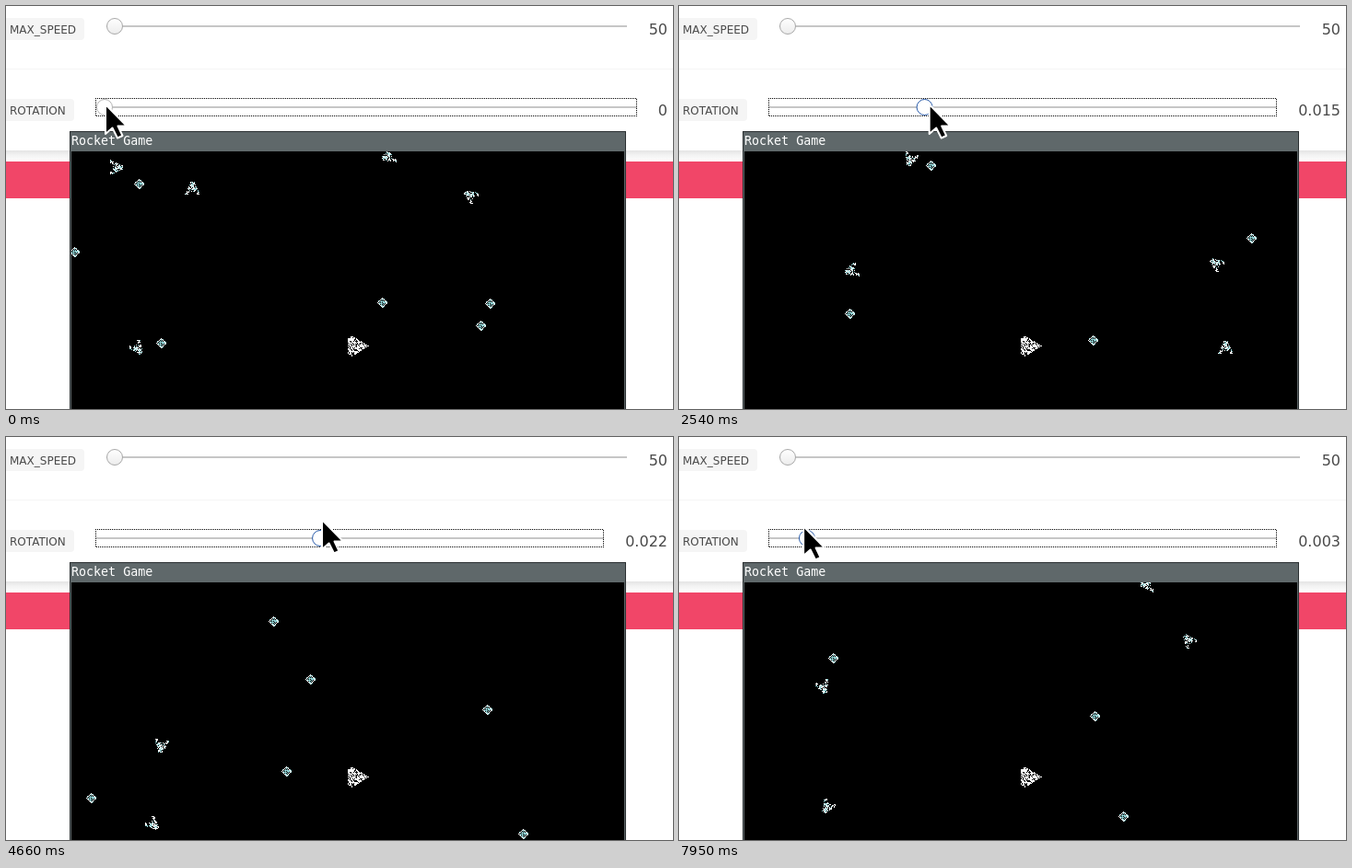
Write an HTML page that moves like this. It is 724 px wide and 438 px high and loops after 7990 ms.

```html
<!DOCTYPE html>
<html lang="en">
<head>
<meta charset="utf-8">
<title>Rocket Game</title>
<style>
html, body { margin: 0; width: 100%; height: 100%; overflow: hidden; background: #fff; }
svg { display: block; width: 724px; height: 438px; }
text { font-family: "DejaVu Sans", sans-serif; fill: #4a4a4a; }
.label { font-size: 12px; }
.value { font-size: 16px; text-anchor: end; }
.title { font: 13.333px "DejaVu Sans Mono", monospace; fill: #fff; }
.pixels { shape-rendering: crispEdges; }
</style>
</head>
<body>
<svg viewBox="0 0 724 438">
  <defs>
    <linearGradient id="shade" x2="0" y2="1">
      <stop offset="0" stop-color="#e4e4e4"/>
      <stop offset=".4" stop-color="#f2f2f2"/>
      <stop offset="1" stop-color="#fff"/>
    </linearGradient>
    <linearGradient id="knob" x2="0" y2="1">
      <stop offset="0" stop-color="#fff"/>
      <stop offset="1" stop-color="#ececec"/>
    </linearGradient>
    <clipPath id="view"><rect x="71" y="158" width="600" height="280"/></clipPath>
  </defs>
  <rect width="724" height="438" fill="#fff"/>
  <rect y="68" width="724" height="1" fill="#f5f5f5"/>
  <rect y="157" width="724" height="12" fill="url(#shade)"/>
  <rect y="169" width="724" height="40" fill="#f14668"/>

  <rect x="-6" y="13" width="91" height="24" rx="4" fill="#f5f5f5"/>
  <text class="label" x="4" y="30">MAX_SPEED</text>
  <rect x="109" y="21" width="565" height="2" fill="#c6c6c6"/>
  <circle cx="118" cy="22" r="8.500" fill="url(#knob)" stroke="#a8a8a8"/>
  <text class="value" x="718" y="31">50</text>

  <rect x="-6" y="101" width="80" height="24" rx="4" fill="#f5f5f5"/>
  <text class="label" x="4" y="118">ROTATION</text>
  <rect id="track" x="98" y="109" height="2" fill="#c6c6c6"/>
  <circle id="thumb" cy="110" r="8.500" fill="#fff"/>
  <path id="focus" fill="none" stroke="#000" stroke-dasharray="1 1" class="pixels"/>
  <text id="value" class="value" x="718" y="119"></text>

  <rect x="69" y="136" width="604" height="302" fill="#2c3133"/>
  <rect x="70" y="137" width="602" height="301" fill="#5f686a"/>
  <text class="title" x="71" y="151">Rocket Game</text>
  <rect x="71" y="158" width="600" height="280" fill="#000"/>
  <g clip-path="url(#view)" class="pixels">
    <path id="white" fill="#fff"/>
    <path id="cyan" fill="#8fd0d2"/>
  </g>
  <path id="cursor" d="M0 0V32L7.500 25.500L13 36.500L18.500 34L13.500 23.500H23Z" fill="#000" stroke="#fff" stroke-width="2" stroke-linejoin="round"/>
</svg>
<script>
const LOOP = 7990, CX = 382, CY = 369, DEG = Math.PI / 180;
const $ = id => document.getElementById(id);

// Turning points of the drag: time, slider value, pointer height
const DRAG = [
  [100, 0, 107], [1120, .0041, 107], [2870, .018, 107], [3410, .0345, 100],
  [4660, .0221, 90], [5200, .0167, 98], [5830, .0131, 107], [7000, .009, 101],
  [7950, .00255, 97]
];

const lerp = (a, b, k) => a + (b - a) * k;
const clamp = k => Math.max(0, Math.min(1, k));
const noise = (u, v) => {
  const n = Math.sin(u * 12.99 + v * 78.23 + 4) * 43758.5;
  return n - Math.floor(n);
};

// Slider value, pointer height and the angle turned so far
function drag(t) {
  let [, v, y] = DRAG[0], angle = 0;
  for (let i = 1; i < DRAG.length; i++) {
    const [t0, v0, y0] = DRAG[i - 1], [t1, v1, y1] = DRAG[i];
    const k = clamp((t - t0) / (t1 - t0));
    if (k === 0) break;
    v = lerp(v0, v1, k);
    y = lerp(y0, y1, k);
    angle += .06 * (v0 + v) / 2 * k * (t1 - t0);
  }
  return { v, y, angle };
}

function turn(x, y, a) {
  const c = Math.cos(a), s = Math.sin(a);
  return [x * c - y * s, x * s + y * c];
}

// Place relative to the rocket and steady drift per second
const SHIPS = [
  [-180, -171, 7, -12], [122, -163, .4, -3.2], [33, -206, 4, -3.7],
  [-168, 122, -4.6, -4], [-240, 2, -.5, -4.5], [-263, -194, -3.5, -7]
];
const ROCKS = [
  [-238, -176, -3, -3.5], [-308, -102, -7, 1], [26, -47, 2.8, -4.4],
  [143, -46, 10.5, 8], [133, -22, -3.2, 4.6], [-214, -3, -3.5, -8],
  [-34, -251, 30, -4.4], [-152, 150, 4, -3.5], [16, 189, -2.4, -6.7],
  [192, 167, 0, 0]
];

// Dot rules: 0 empty, 1 white, 2 cyan
function shipDot(u, v) {
  const w = Math.abs(v);
  if (u < -6 || u > 7) return 0;
  const wing = Math.abs(w - (7 - u) * .5) < 1.7;
  const hull = w < 3 && u > -4;
  const n = noise(u, v);
  return !(wing || hull) || n < .32 ? 0 : n < .8 ? 1 : 2;
}
function rockDot(u, v) {
  const m = Math.abs(u) + Math.abs(v);
  if (m > 6 || Math.abs(u) > 5 || Math.abs(v) > 5) return 0;
  if (m % 2) return m === 5 ? 1 : 2;
  return noise(u, v) > .7 ? 2 : 0;
}
function rocketDot(u, v) {
  const half = u < -3 ? 11 - Math.abs(u + 7) * .6 : (11 - u) * .65;
  return Math.abs(v) <= half && noise(u, v) > .33 ? 1 : 0;
}

function stamp(out, dot, x, y, size, angle) {
  x = Math.round(x);
  y = Math.round(y);
  for (let j = -size; j <= size; j++)
    for (let i = -size; i <= size; i++) {
      const [u, v] = turn(i, j, -angle).map(Math.round);
      const c = dot(u, v);
      if (c) out[c] += `M${x + i} ${y + j}h1v1h-1z`;
    }
}

function draw(t) {
  const { v, y, angle } = drag(t);
  const step = Math.round(v * 1000) / 1000;
  const label = String(step);
  const width = label.includes(".") ? label.length * 10.18 - 5 : 10.18;
  const right = Math.round(695 - width);

  $("value").textContent = label;
  $("track").setAttribute("width", right - 98);
  $("focus").setAttribute("d",
    `M97 100.500H${right}M98 119.500H${right}M97.500 100V120M${right - .5} ${100 + right % 2}V120`);
  $("thumb").setAttribute("cx", 107 + (right - 117) * step / .05);
  $("thumb").setAttribute("stroke", t < 40 ? "#b4b4b4" : "#2a5caa");
  $("cursor").setAttribute("transform", `translate(${108 + 10640 * v} ${y})`);

  const out = ["", "", ""];
  const float = (dot, [x, y, vx, vy], spin) => {
    const [px, py] = turn(x + vx * t / 1000, y + vy * t / 1000, angle);
    stamp(out, dot, CX + px, CY + py, 8, spin);
  };
  SHIPS.forEach((s, i) => float(shipDot, s, angle - (90 + 54 * i) * DEG));
  ROCKS.forEach(r => float(rockDot, r, 0));
  stamp(out, rocketDot, CX, CY, 11, 0);
  $("white").setAttribute("d", out[1]);
  $("cyan").setAttribute("d", out[2]);
}

const start = performance.now();
function tick() {
  draw((performance.now() - start) % LOOP);
  requestAnimationFrame(tick);
}
tick();
</script>
</body>
</html>
```
